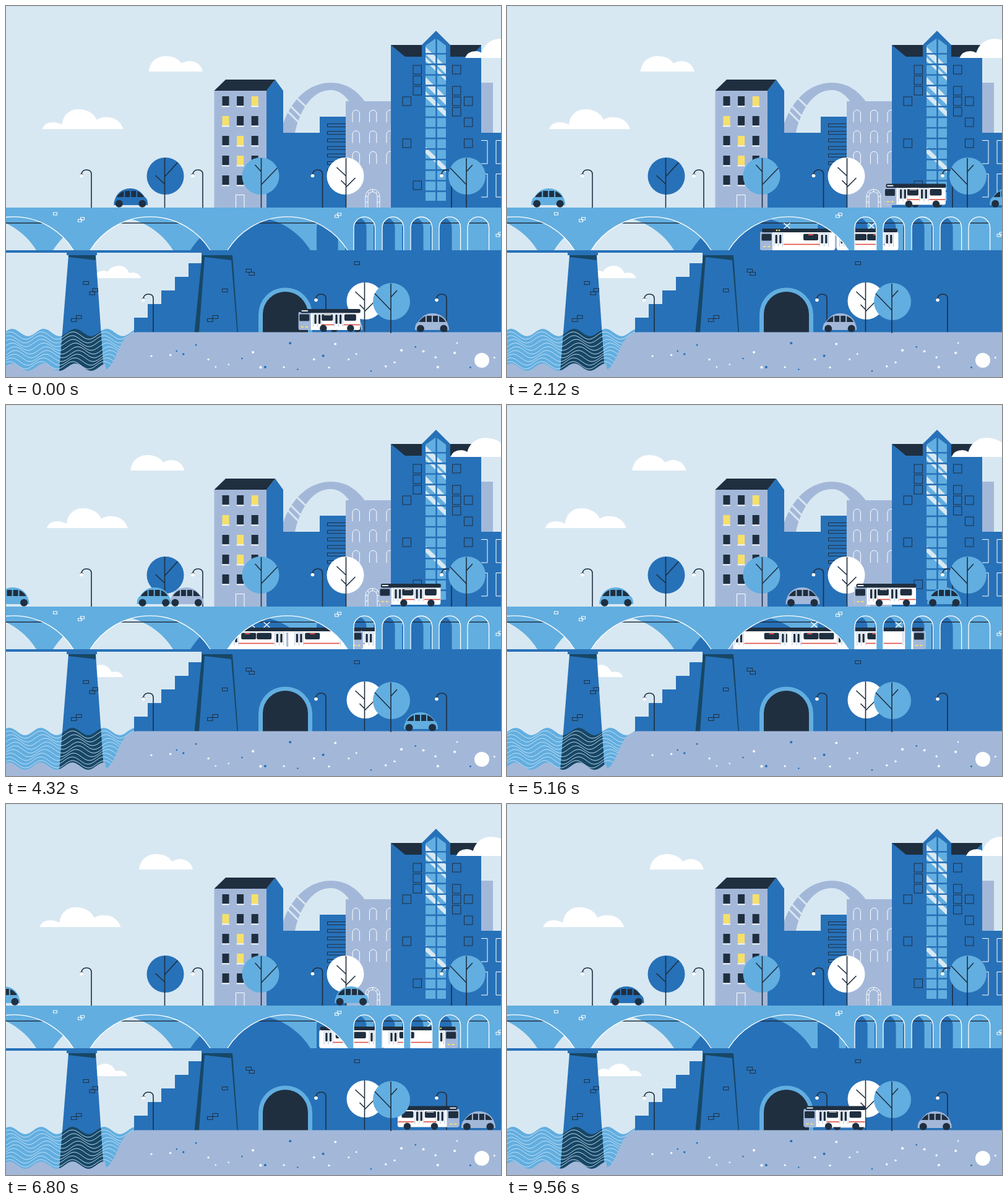
These frames come from a looping animation (800x600 px, 9.6 s). An HTML page:

```html
<!DOCTYPE html>
<html lang="en">
<head>
<meta charset="utf-8">
<title>City bridge</title>
<style>
  html, body { margin: 0; width: 100%; height: 100%; overflow: hidden; background: #d8e8f2; }
  svg { display: block; width: 800px; height: 600px; }
  .b { fill: #2771b8 } .l { fill: #62aee0 } .g { fill: #a3b8d9 } .d { fill: #1f2f40 }
  .w { fill: #fff } .n { fill: #174766 } .y { fill: #f6e06a } .r { fill: #dc4c40 } .s { fill: #d8e8f2 }
  .dl { fill: none; stroke: #1f2f40; stroke-width: 1.6 }
  .wl { fill: none; stroke: #fff; stroke-width: 1.3 }
  .thin { stroke-width: 1 }
  .seam { fill: none; stroke: #a3b8d9; stroke-width: .8 }
</style>
</head>
<body>
<svg viewBox="0 0 800 600">
  <defs>
    <clipPath id="road"><path d="M415 400H800V540H415Z"/></clipPath>
    <clipPath id="wet"><path id="wetEdge"/></clipPath>
    <g id="lamp"><path class="dl" d="M0 0V-54Q0 -61 -8 -61Q-15 -61 -16 -54"/><path class="d" d="M-19 -53a3.2 3.2 0 0 1 6 0z"/><circle class="w" cx="-16" cy="-51.5" r="2.8"/></g>
    <path id="limbsA" class="dl" d="M0 0V-80M0 -50L21 -73M0 -38L-15 -52"/>
    <path id="limbsB" class="dl" d="M0 0V-80M0 -37L26 -64M0 -58L-10 -69"/>
    <path id="limbsC" class="dl" d="M0 0V-80M0 -51L-15 -65M0 -33L15 -48M0 -36L-8 -44"/>
    <path id="pier" d="M101 403H145L158 592H86Z"/>
  </defs>

  <rect class="s" width="800" height="600"/>
  <rect width="800" height="1" fill="#cbdde9"/>
  <path id="cloud1" class="w" d="M0 32Q4 21 17 21Q25 21 32 25C34 8 45 0 59 0C74 0 85 8 88 17Q97 12 106 13Q125 14 131 32Z"/>
  <path id="cloud2" class="w" d="M0 25C2 8 14 0 28 0C40 0 49 5 53 12Q60 8 67 8Q84 10 87 25Z"/>
  <path id="cloud4" class="w" d="M-76 20Q-72 8 -60 8Q-56 8 -54 10Q-48 0 -36 0Q-24 0 -19 12Q-4 9 0 20Z"/>

  <!-- skyline -->
  <path class="g" d="M448 205V190C462 150 490 124 525 124Q559 124 581 156H556Q542 136 525 136C495 136 475 168 467 205Z"/>
  <path d="M453 168L474 189M460 162L480 182M466 145L490 168" fill="none" stroke="#d8e8f2" stroke-width="3"/>
  <path class="b" d="M420 326V205H507V179H549V205H625V326Z"/>
  <g id="slats" class="dl thin"></g>
  <path class="g" d="M549 154H622V326H549Z"/>
  <g id="arches" class="wl thin"></g>
  <path class="wl thin" d="M581 326V308a11.500 11.500 0 0 1 23 0V326M585 326V308a7.500 7.500 0 0 1 15 0V326M581 317h4M581 308h4M600 317h4M600 308h4M584 300l3 3M592.500 296.500v4M601 300l-3 3"/>
  <path class="g" d="M336.500 137H421V326H336.500Z"/>
  <path class="b" d="M421 137L435 119L448 137V326H421Z"/>
  <path class="d" d="M336.500 137L355 119H435L421 137Z"/>
  <g id="flats"></g>
  <path class="wl thin" d="M371.500 326V305.500H385V326"/>
  <path class="g" d="M768 124H787V206H768Z"/>
  <path class="b" d="M768 205H800V326H768ZM622 63H768V326H622Z"/>
  <path class="wl thin" d="M768 217.500H778V255H768M768 271.500H778V309H768M801 217.500H792V255H801M801 271.500H792V309H801"/>
  <path class="d" d="M622 63H768V64L750 82H645L622 63Z"/>
  <path class="b" d="M672 90V63L695 40L718 63V90Z"/>
  <path class="l" d="M678 315V64L695 52L711 64V315Z"/>
  <path id="glints" class="s"/>
  <path id="mullions" fill="none" stroke="#2771b8" stroke-width="2.6"/>
  <g id="panes" class="dl thin"></g>
  <path id="cloud3" class="w" d="M0 31Q4 20 17 20Q23 20 27 23C31 8 43 0 57 0Q90 2 92 31Z"/>

  <!-- upper road -->
  <use href="#lamp" x="138" y="326"/><use href="#lamp" x="318" y="326"/>
  <use href="#lamp" x="511.5" y="326"/><use href="#lamp" x="720" y="326"/>
  <circle class="b" cx="257.5" cy="275" r="30"/><use href="#limbsA" x="256.5" y="326"/>
  <circle class="w" cx="548.5" cy="275" r="30"/><use href="#limbsC" x="549.5" y="326"/>
  <g id="upper"></g>
  <circle class="l" cx="411.5" cy="275" r="30"/><use href="#limbsB" x="412.5" y="326"/>
  <circle class="l" cx="745" cy="275" r="30"/><use href="#limbsB" transform="translate(744 326) scale(-1 1)"/>

  <!-- bridge -->
  <path class="b" d="M298 326H800V396H298Z"/>
  <path id="back" class="l" fill-rule="evenodd" transform="translate(-60)"/>
  <path class="dl" d="M0 351H800"/>
  <g id="rails"></g>
  <path id="front" class="l" fill-rule="evenodd"/>
  <path id="rims" class="wl"/>
  <g id="paleBricks" class="wl thin"></g>

  <!-- water, piers and wall -->
  <path id="water" class="l"/>
  <use href="#pier" class="b"/>
  <use href="#pier" class="n" clip-path="url(#wet)"/>
  <g clip-path="url(#wet)"><path id="ripples" fill="none" stroke="#cfe5f4" stroke-width=".9"/></g>
  <path class="n" d="M101 403H145V411L101 406Z"/>
  <path class="b" d="M0 395H320V399H147V403H98V399H0Z"/>
  <path class="b" d="M207 528V504H229V482H251V460H273V438H295V416H316V395H800V528Z"/>
  <path class="n" d="M317 403H366L375 528H373.500L364 411L321 406L312 528H304.500Z"/>
  <g id="bricks" class="dl thin"></g>
  <path class="l" d="M408 528V499A43.500 43.500 0 0 1 495 499V528Z"/>
  <path class="d" d="M415 528V498.500A36.500 36.500 0 0 1 488 498.500V528Z"/>

  <!-- lower road -->
  <use href="#lamp" x="238" y="527"/><use href="#lamp" x="517" y="527"/><use href="#lamp" x="712" y="527"/>
  <circle class="w" cx="580.5" cy="477" r="30"/><use href="#limbsC" x="579.5" y="527"/>
  <g id="lower" clip-path="url(#road)"></g>
  <path id="ground" class="g"/>
  <circle class="l" cx="623" cy="478" r="30"/><use href="#limbsB" transform="translate(622 529) scale(-1 1)"/>
  <g id="pebbles"></g>
  <circle class="w" cx="769" cy="573" r="12"/>
</svg>

<script>
const LOOP = 9600, TAU = Math.PI * 2;
const $ = id => document.getElementById(id);
const range = n => [...Array(n).keys()];
const each = (n, make) => range(n).map(make).join('');
const box = (x, y, w, h, c = '', rx = 0) => `<rect x="${x}" y="${y}" width="${w}" height="${h}" rx="${rx}" class="${c}"/>`;
const dot = (x, y, r, c) => `<circle cx="${x}" cy="${y}" r="${r}" class="${c}"/>`;
const fill = (id, html) => { $(id).innerHTML = html; };
const path = (id, d) => $(id).setAttribute('d', d);

// Buildings
fill('slats', each(7, i => box(519.5, 190.5 + 12.2 * i, 40, 5)));
fill('arches', each(9, i => {
  const x = 560 + 27.5 * (i % 3), y = 168 + 33.5 * Math.floor(i / 3);
  return `<path d="M${x} ${y + 20}V${y + 6}a5.700 5.700 0 0 1 11.400 0V${y + 20}"/>`;
}));
const litColumn = [2, 0, 1, 1];
fill('flats', each(15, i => {
  const c = i % 3, r = Math.floor(i / 3), x = 349.5 + 23.6 * c, y = 146 + 32 * r;
  return box(x, y, 11, 15.5, litColumn[r] === c ? 'y' : 'd') + box(x - .5, y + 15.5, 12, 1.8, 'w');
}));
const glint = (y, h) => `M678 ${y}l33 32v${h}l-33 -32Z`;
path('glints', glint(66, 12) + glint(83, 6) + glint(115, 13) + glint(138, 10) + glint(228, 10));
path('mullions', 'M695.500 50V316' + each(15, i => `M677 ${77.3 + 17.1 * i}H712`));
const openRows = { 641: [3, 7], 658: [0, 1, 2, 11], 721.5: [0, 2, 3, 4], 740.5: [3, 5, 7] };
fill('panes', Object.entries(openRows).map(([x, rows]) =>
  rows.map(r => box(x, 96 + 17 * r, 13.5, 14)).join('')).join(''));

// Bridge
const big = [-85, 136, 358].map(x => `M${x} 395A114 114 0 0 1 ${x + 194} 395`);
const small = range(5).map(i => `M${562 + 46 * i} 395V358.500a17.300 17.300 0 0 1 34.600 0V395`);
const holes = [...big, ...small];
const facade = 'M-10 326H870V395.500H-10Z' + holes.map(h => h + 'Z').join('');
path('back', facade);
path('front', facade);
path('rims', holes.join(''));

const brick = (x, y) => box(x, y, 8.5, 5);
const brickPair = (x, y, dx, dy) => brick(x, y) + brick(x + dx, y + dy);
const paleBrick = (x, y) => box(x, y, 6, 4);
const palePair = (x, y) => paleBrick(x, y) + paleBrick(x + 4, y - 3);
fill('paleBricks', paleBrick(76.5, 334) + palePair(116.5, 345) + palePair(531.5, 338) + palePair(792, 369));
fill('bricks', brick(563, 413.5) + brick(125, 445.5) + brick(349.5, 457.5) + brickPair(388, 425.5, 5, 5)
  + brickPair(135, 462, 5, -5) + brickPair(105.5, 505.5, 8, -5) + brickPair(325.5, 505.5, 8.5, -5));

// Pebbles
let seed = 11;
const random = () => (seed = seed * 16807 % 2147483647) / 2147483647;
fill('pebbles', each(34, i =>
  dot(235 + 560 * (i + random()) / 34, 544 + 50 * random(), 1.2 + .9 * random(), random() < .6 ? 'w' : 'b')));

// Vehicles, all facing left
const car = paint => `<path class="${paint}" d="M0 27C0 19 2 16 5 14C11 5 18 0 28 0C42 0 50 8 53 17Q55 21 55 27Z"/>
  <path class="d" d="M6 14Q11 7 17 4.500V14ZM19 4H27V14H19ZM29 4H37V14H29ZM39 4.500Q46 7 50 14H39Z"/>
  ${dot(9, 24.8, 6, 'd') + dot(46.5, 24.8, 6, 'd')}`;

const door = (x, y, h) => `<path class="seam" d="M${x - 1.5} ${y + h + 5}V${y - 2}h14V${y + h + 5}M${x + 5.5} ${y - 2}V${y + h + 5}"/>`
  + box(x + .5, y, 3.4, h, 'd', 1) + box(x + 7.1, y, 3.4, h, 'd', 1);
const panel = (x, w) => box(x, 8.5, w, 10.5, 'd', 2);
const stripe = (x, w) => box(x, 24.7, w, 1.6, 'r');
const face = box(2.5, 8.5, 16, 11, 'd', 1.5) + box(5, 28, 4, 2, 'y') + box(12, 28, 4, 2, 'y');

const bus = `<g class="body">${box(1, 5, 99.5, 29, 'w', 3)}<path class="g" d="M1 5H21V34H4Q1 34 1 31Z"/>
  ${box(4, 0, 97, 6.5, 'd', 2.5) + box(6, 2.2, 10, 1.8, 'w') + face}
  ${door(26, 9, 15) + door(60, 9, 15) + panel(38.5, 18) + panel(75, 19)}
  ${box(42, 9, 12, 1.2, 'w') + stripe(38, 20) + stripe(74, 26)}</g>
  ${dot(41, 31.3, 5.7, 'd') + dot(85, 31.3, 5.7, 'd')}`;

const pantograph = x => `<path class="wl" d="M${x - 5} -9l10 9m0 -9l-10 9"/>`;
const train = `${box(0, 5, 121.5, 30, 'w', 4) + box(123.5, 5, 100, 30, 'w', 4)}
  <path class="g" d="M0 8Q0 5 3 5H20V35H4Q0 35 0 31ZM121 8H124V31H121Z"/>
  ${box(3, 0, 118, 6, 'd', 2) + box(124, 0, 98, 6, 'd', 2) + face + dot(27, 2.8, 1.4, 'y') + dot(31, 2.8, 1.4, 'y')}
  ${[24, 98, 130, 203].map(x => door(x, 10, 14)).join('')}
  ${[70, 148, 173].map(x => panel(x, 24)).join('') + box(78, 9, 8, 2, 'r') + box(183, 9, 8, 2, 'r')}
  ${stripe(38, 58) + stripe(144, 57) + pantograph(43.5) + pantograph(180)}`;

// Motion rules: each returns x for a time in the loop
const drive = (from, to, start, span, power) => t => {
  const u = Math.min(1, (t - start + LOOP) % LOOP / span);
  return from + (to - from) * u ** power;
};
// Brakes into a stop at x, then pulls away
const halt = (x, middle, pull) => t => x + pull * ((t - middle) / 1000) ** 5;
const sway = (middle, reach, peak) => t => middle + reach * Math.cos(TAU * (t - peak) / LOOP);

const movers = [];
function add(layer, art, width, y, right, x) {
  const g = document.createElementNS('http://www.w3.org/2000/svg', 'g');
  g.innerHTML = right ? `<g transform="translate(${width}) scale(-1 1)">${art}</g>` : art;
  $(layer).append(g);
  movers.push({ g, y, x });
}
const rightCar = (paint, start, span, power) => add('upper', car(paint), 55, 295, true, drive(-60, 830, start, span, power));
const leftCar = (start, span) => add('upper', car('l'), 55, 295, false, drive(815, -60, start, span, 2.2));

rightCar('b', 8030, 4386, 1.3);
rightCar('g', 2301, 4386, 1.3);
rightCar('l', 4320, 3800, .96);
add('upper', bus, 101, 289, false, halt(604, 3300, -1.95));
leftCar(9231, 2630);
leftCar(1440, 2947);
leftCar(1648, 3165);
leftCar(3897, 2947);

add('rails', train, 224, 360, false, halt(378.5, 3630, -3.9));
add('rails', train, 224, 360, true, halt(453, 5640, 25));

add('lower', car('g'), 55, 497, false, drive(805, 345, 5900, 6000, 1));
add('lower', car('l'), 55, 497, true, drive(345, 805, 3090, 1900, 1));
add('lower', bus, 101, 490, true, halt(633, 7300, 18));
add('lower', bus, 101, 490, false, drive(805, 310, 7333, 3200, 1.15));
add('lower', car('g'), 55, 497, false, drive(805, 345, 7290, 6640, 1.1));

movers.push(
  { g: $('cloud1'), y: 167, x: sway(61, 8, 2900) },
  { g: $('cloud2'), y: 81, x: sway(216, 15, 9300) },
  { g: $('cloud3'), y: 53, x: sway(730, 12, 9500) },
  { g: $('cloud4'), y: 420, x: sway(203, 15.5, 300) }
);

// Water: crests rock to and fro, each line a little later than the one above
const crest = (y, line, t) => {
  const shift = 112 + 5 * Math.sin(TAU * 4 * t / LOOP - .8 * line);
  return range(55).map(i => `${4 * i} ${(y - 6 * Math.cos(TAU * (4 * i - shift) / 51)).toFixed(2)}`).join('L');
};

function drawWater(t) {
  const surface = `M${crest(528, 0, t)}V600H0Z`;
  path('water', surface);
  path('wetEdge', surface);
  path('ripples', each(9, i => 'M' + crest(533 + 6 * i, i + 1, t)));
  const bed = crest(584, 0, t).split('L').slice(0, 41).join('L');
  path('ground', `M${bed}L162 588C182 576 180 532 210 527.500H800V600H0Z`);
}

const bodies = document.querySelectorAll('.body');
function draw(t) {
  for (const { g, y, x } of movers) g.setAttribute('transform', `translate(${x(t).toFixed(2)} ${y})`);
  const bounce = Math.cos(TAU * t / 120) - 1;
  bodies.forEach(b => b.setAttribute('transform', `translate(0 ${bounce.toFixed(2)})`));
  drawWater(t);
}

const start = performance.now();
function tick() {
  draw((performance.now() - start) % LOOP);
  requestAnimationFrame(tick);
}
tick();
</script>
</body>
</html>
```
